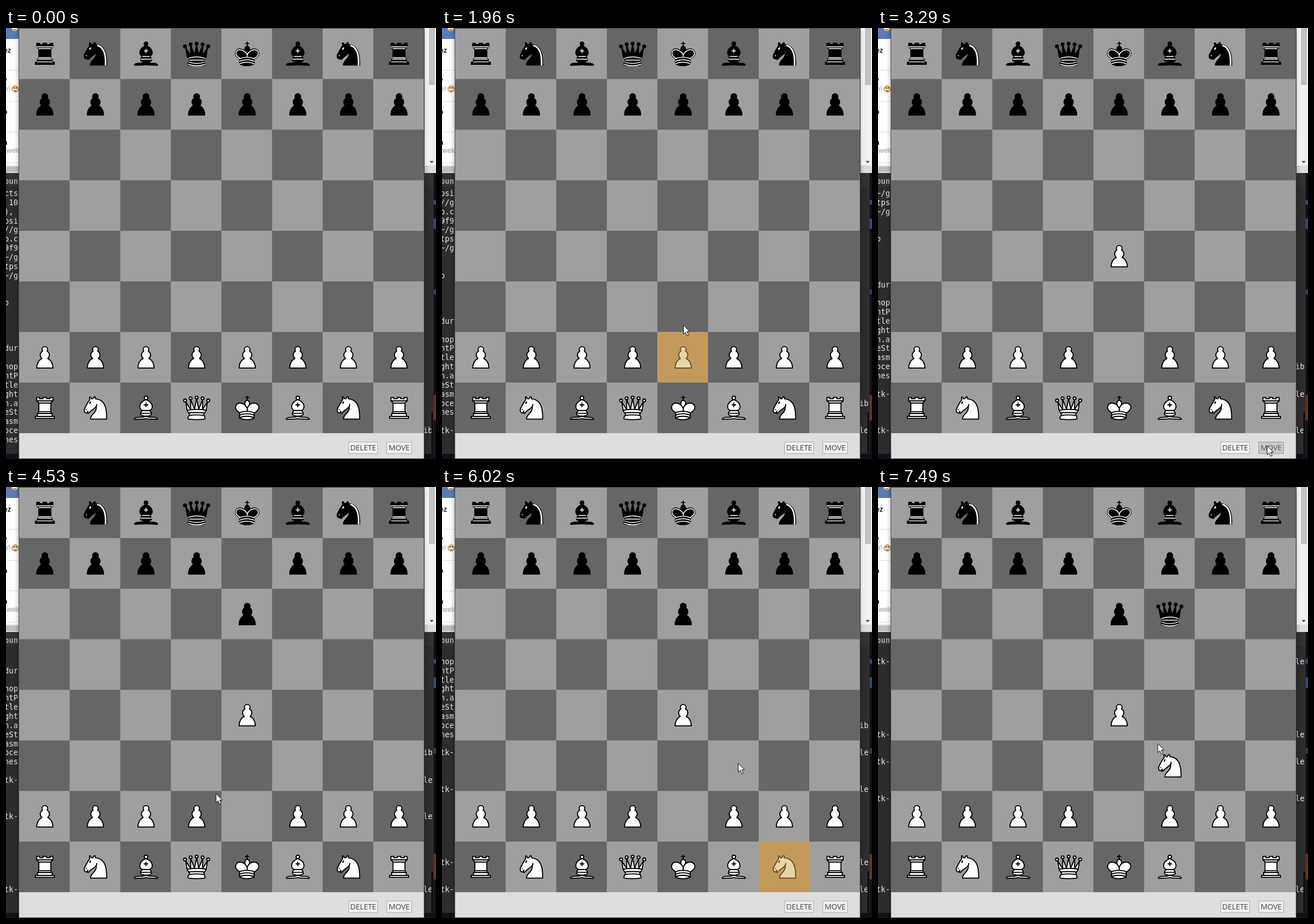
An HTML page with a canvas for the animation above (8 s loop, 747x749 px).

```html
<!DOCTYPE html>
<html>
<head>
<meta charset="utf-8">
<style>
html, body { margin: 0; width: 100%; height: 100%; overflow: hidden; background: #150e1a; }
canvas { display: block; }
</style>
</head>
<body>
<canvas id="stage" width="747" height="749"></canvas>
<script>
const ctx = document.getElementById('stage').getContext('2d');
const LOOP = 8000, CELL = 87.9, LEFT = 22.7, TOP = 0.9, SCALE = 1.22;

// Pieces on a 45-unit grid. body: filled and outlined; lines: inner strokes; dots: inner fills.
const kingBase = 'M11.5,30C17,27 27,27 32.5,30M11.5,33.5C17,30.5 27,30.5 32.5,33.5M11.5,37C17,34 27,34 32.5,37';
const circle = (x, y, r) => `M${x - r},${y}a${r},${r} 0 1 1 ${2 * r},0a${r},${r} 0 1 1 ${-2 * r},0z`;
const shapes = {
  p: { mid: [22, 24.25], body: [
    'M22,9C19.79,9 18,10.79 18,13C18,13.89 18.29,14.71 18.78,15.38C16.83,16.5 15.5,18.59 15.5,21C15.5,23.03 16.44,24.84 17.91,26.03C14.91,27.09 10.5,31.58 10.5,39.5L33.5,39.5C33.5,31.58 29.09,27.09 26.09,26.03C27.56,24.84 28.5,23.03 28.5,21C28.5,18.59 27.17,16.5 25.22,15.38C25.71,14.71 26,13.89 26,13C26,10.79 24.21,9 22,9z'] },
  r: { mid: [22.5, 24], body: [
    'M9,39H36V36H9z', 'M12,36V32H33V36z', 'M14,29.5V17H31V29.5z', 'M14,29.5H31L32.5,32H12.5z',
    'M11,14H34L31,17H14z', 'M11,14V9H15V11H20V9H25V11H30V9H34V14z'],
    darkLines: 'M12,35.5H33M13,31.5H32M14,29.5H31M14,16.5H31M11,14H34' },
  n: { mid: [22, 23], body: [
    'M22,10C32.5,11 38.5,18 38,39L15,39C15,30 25,32.5 23,18',
    'M24,18C24.38,20.91 18.45,25.37 16,27C13,29 13.18,31.34 11,31C9.96,30.06 12.41,27.96 11,28C10,28 11.19,29.23 10,30C9,30 6,31 6,26C6,24 12,14 12,14C12,14 13.89,12.1 14,10.5C13.27,9.5 13.5,8.5 13.5,7.5C14.5,6.5 16.5,10 16.5,10L18.5,10C18.5,10 19.28,8 21,7C22,7 22,10 22,10'],
    dots: circle(9, 25.5, 0.8) + 'M15.4,14A.8,1.8 30 1 1 13.6,17A.8,1.8 30 1 1 15.4,14',
    darkDots: 'M24.55,10.4L24.1,11.85L24.6,12C27.75,13 30.25,14.49 32.5,18.75C34.75,23 35.75,29.06 35.25,39L35.2,39.5H37.45L37.5,39C38,28.94 36.62,22.15 34.25,17.66C31.88,13.17 28.46,11.02 25.06,10.5z' },
  b: { mid: [22.5, 22.25], body: [
    'M9,36C12.39,35.03 19.11,36.43 22.5,34C25.89,36.43 32.61,35.03 36,36C36,36 37.65,36.54 39,38C38.32,38.97 37.35,38.99 36,38.5C32.61,37.53 25.89,38.96 22.5,37.5C19.11,38.96 12.39,37.53 9,38.5C7.65,38.99 6.68,38.97 6,38C7.35,36.06 9,36 9,36z',
    'M15,32C17.5,34.5 27.5,34.5 30,32C30.5,30.5 30,30 30,30C30,27.5 27.5,26 27.5,26C33,24.5 33.5,14.5 22.5,10.5C11.5,14.5 12,24.5 17.5,26C17.5,26 15,27.5 15,30C15,30 14.5,30.5 15,32z',
    circle(22.5, 8, 2.5)],
    lines: 'M17.5,26H27.5M15,30H30M22.5,15.5V20.5M20,18H25' },
  q: { mid: [22.5, 22.6], body: [
    circle(6, 12, 2) + circle(14, 9, 2) + circle(22.5, 8, 2) + circle(31, 9, 2) + circle(39, 12, 2),
    'M9,26C17.5,24.5 30,24.5 36,26L38,14L31,25V11L25.5,24.5L22.5,9.5L19.5,24.5L14,10.5V25L7,14z',
    'M9,26C9,28 10.5,28 11.5,30C12.5,31.5 12.5,31 12,33.5C10.5,34.5 10.5,36 10.5,36C9,37.5 11,38.5 11,38.5C17.5,39.5 27.5,39.5 34,38.5C34,38.5 35.5,37.5 34,36C34,36 34.5,34.5 33,33.5C32.5,31 32.5,31.5 33.5,30C34.5,28 36,28 36,26C27.5,24.5 17.5,24.5 9,26z'],
    lightLines: 'M11.5,30C15,29 30,29 33.5,30M12,33.5C18,32.5 27,32.5 33,33.5',
    darkLines: 'M11,29A35,35 0 0 1 34,29M12.5,31.5H32.5M11.5,34.5A35,35 0 0 0 33.5,34.5M10.5,37.5A35,35 0 0 0 34.5,37.5' },
  k: { mid: [22.5, 22.8], body: [
    'M22.5,11.63V6M20,8H25',
    'M22.5,25C22.5,25 27,17.5 25.5,14.5C25.5,14.5 24.5,12 22.5,12C20.5,12 19.5,14.5 19.5,14.5C18,17.5 22.5,25 22.5,25',
    'M11.5,37C17,40.5 27,40.5 32.5,37V30C32.5,30 41.5,25.5 38.5,19.5C34.5,13 25,16 22.5,23.5V27V23.5C19,16 9.5,13 6.5,19.5C3.5,25.5 11.5,29.5 11.5,29.5z'],
    lines: kingBase,
    darkLines: 'M32,29.5C32,29.5 40.5,25.5 38.03,19.85C34.15,14 25,18 22.5,24.5V26.6V24.5C20,18 9.9,14 7,19.85C4.5,25.5 11.85,28.85 11.85,28.85' },
};
for (const s of Object.values(shapes))
  for (const key in s)
    if (key === 'body') s.body = s.body.map(d => new Path2D(d));
    else if (key !== 'mid') s[key] = new Path2D(s[key]);

const start = 'rnbqkbnrpppppppp' + ' '.repeat(32) + 'PPPPPPPPRNBQKBNR';
const moves = [[2350, 52, 36], [3490, 12, 20], [6070, 62, 45], [7180, 3, 21]];
const selections = [[1440, 2350, 52], [5440, 6070, 62]];
const presses = [[3290, 3450], [7060, 7140]];
const scrolls = [[1440, 3], [2350, 7], [3490, 15], [5440, 18], [6070, 22], [7180, 32]];

// Terminal rows, visible left ends; log rows follow at irregular gaps
const rows = 'cts| 10|), |psi|//g|o.c|9f9|~/g|tps|~/g|||o|||||dur||hop|ntP|tle|ght|n.a|eSt|asm|oce|nes'.split('|');
for (const i of [29, 33, 41, 44, 48, 58]) rows[i] = 'tk-';

// Pointer strokes: begin, end, number of steps, then [fraction, x, y]
const strokes = [
  [680, 1240, 12, [0, 742, 722], [0.75, 432, 524], [1, 419.5, 547]],
  [1800, 2310, 13, [0, 419.5, 547], [1, 419, 406]],
  [2590, 3250, 16, [0, 419, 406], [0.25, 411, 397], [1, 676, 726]],
  [4180, 4950, 18, [0, 676, 726], [0.53, 344, 520], [1, 489, 587]],
  [4990, 5230, 7, [0, 489, 587], [1, 590, 658]],
  [5480, 6020, 14, [0, 590, 658], [1, 514.5, 480]],
  [6290, 7010, 17, [0, 514.5, 480], [1, 676, 720]],
  [7180, 7490, 8, [0, 676, 720], [1, 486, 446]],
];
const arrow = new Path2D('M0,0V15.5L3.6,12.2L6.2,18.2L8.8,17L6.2,11.2H11z');

function rect(color, x, y, w, h) {
  ctx.fillStyle = color;
  ctx.fillRect(x, y, w, h);
}

function text(str, x, y, font, color) {
  ctx.font = font;
  ctx.fillStyle = color;
  ctx.fillText(str, x, y);
}

function smiley(x, y) {
  ctx.fillStyle = '#ecca86';
  ctx.strokeStyle = '#94703c';
  ctx.lineWidth = 0.8;
  ctx.beginPath();
  ctx.arc(x, y, 5.8, 0, 7);
  ctx.fill();
  ctx.stroke();
  rect('#5a4028', x - 3, y - 3, 2, 2);
  rect('#5a4028', x + 1, y - 3, 2, 2);
  rect('#fff', x - 3, y, 6, 2);
  rect('#c86060', x - 2, y + 2, 4, 2);
}

function drawChat() {
  rect('#fff', 0, 0, 747, 239);
  rect('#5a7cb8', 0, 0, 22, 19);
  smiley(15, 0);
  for (const y of [73, 127, 180, 234]) rect('#dddfe3', 0, y, 22, 1);
  const bold = 'bold 12px "Liberation Sans", sans-serif';
  const plain = '12px "Liberation Sans", sans-serif';
  text('ez', -4, 43, bold, '#1d2129');
  text('y', -5, 95, bold, '#1d2129');
  text('e!', -3, 110, plain, '#90949c');
  smiley(16, 106);
  text('o', -5, 150, bold, '#1d2129');
  text('n', -5, 203, bold, '#1d2129');
  text('welc', 1, 217, plain, '#90949c');
  rect('#f1f1f1', 733, 0, 14, 239);
  rect('#c1c1c1', 735, 0, 10, 99);
  ctx.fillStyle = '#505050';
  ctx.fill(new Path2D('M736,231H743L739.5,235z'));
  rect('#dcdcdc', 0, 239, 747, 13);
  rect('#bcbcbc', 0, 241, 22, 9);
}

function drawTerminal(t) {
  rect('#333230', 0, 252, 743, 24);
  rect('#2d2d2d', 0, 276, 743, 464);
  text('bun', -3, 271, 'bold 13.3px "DejaVu Sans Mono", monospace', '#aaa69d');
  const shift = scrolls.reduce((s, [at, n]) => t >= at ? n : s, 0);
  const font = '13.2px "DejaVu Sans Mono", monospace';
  for (let i = 0; i < 28; i++) {
    const row = rows[i + shift], y = 292 + i * 15.85;
    if (!row) continue;
    text(row, -3, y, font, '#e8e8e8');
    const tail = { 'oce': 'ib', 'tk-': 'le' }[row];
    if (tail) text(tail, 725, y, font, '#e8e8e8');
  }
  rect('#0c0c0c', 739, 668, 3, 71);
  // desktop showing past the windows
  rect('#150e1a', 743, 252, 4, 497);
  rect('#2f4c7c', 743, 299, 4, 8);
  rect('#2f4c7c', 743, 331, 4, 18);
  rect('#27425f', 743, 454, 4, 9);
  rect('#6a3020', 743, 638, 4, 44);
  rect('#150e1a', 0, 740, 747, 9);
}

function drawPiece(code, x, y, selected) {
  const s = shapes[code.toLowerCase()], dark = code === code.toLowerCase();
  const edge = selected ? '#704a1f' : '#000';
  const fill = dark ? '#000' : selected ? '#e6d5a8' : '#fff';
  const inner = dark ? '#fff' : edge;
  ctx.save();
  ctx.translate(x, y);
  ctx.scale(SCALE, SCALE);
  ctx.translate(-s.mid[0], -s.mid[1]);
  ctx.lineWidth = 1.5;
  ctx.lineJoin = ctx.lineCap = 'round';
  ctx.fillStyle = fill;
  ctx.strokeStyle = edge;
  for (const path of s.body) {
    ctx.fill(path);
    ctx.stroke(path);
  }
  ctx.fillStyle = ctx.strokeStyle = inner;
  if (dark) ctx.lineWidth = 1.2;
  for (const path of [s.lines, dark ? s.darkLines : s.lightLines]) if (path) ctx.stroke(path);
  for (const path of [s.dots, dark && s.darkDots]) if (path) ctx.fill(path);
  ctx.restore();
}

function drawBoard(t) {
  const board = [...start];
  for (const [at, from, to] of moves)
    if (t >= at) {
      board[to] = board[from];
      board[from] = ' ';
    }
  const picked = selections.find(([a, b]) => t >= a && t < b);
  rect('#9f9f9f', LEFT, TOP, 8 * CELL, 8 * CELL);
  board.forEach((code, i) => {
    const col = i % 8, row = i >> 3, selected = !!picked && picked[2] === i;
    const x = LEFT + col * CELL, y = TOP + row * CELL;
    if (selected || (col + row) % 2) rect(selected ? '#c49a5c' : '#666', x, y, CELL, CELL);
    if (code !== ' ') drawPiece(code, x + CELL / 2 + 0.8, y + CELL / 2, selected);
  });
}

function drawButton(label, x, w, pressed) {
  rect(pressed ? '#9a9a9a' : '#b2b2b2', x, 719, w, 21);
  rect(pressed ? '#cacaca' : '#efefef', x + 1, 720, w - 2, 19);
  ctx.textAlign = 'center';
  text(label, x + w / 2, 734, '13px "Open Sans", "Noto Sans", sans-serif', pressed ? '#555' : '#444');
  ctx.textAlign = 'left';
}

function drawWindow(t) {
  ctx.save();
  ctx.shadowColor = 'rgba(0, 0, 0, 0.4)';
  ctx.shadowBlur = 8;
  rect('#333', 22, 0, 705, 749);
  ctx.restore();
  rect('#dedede', LEFT, 704, 8 * CELL, 44);
  drawBoard(t);
  drawButton('DELETE', 595, 51, false);
  drawButton('MOVE', 661, 44, presses.some(([a, b]) => t >= a && t < b));
}

function pointerAt(t) {
  const stroke = strokes.filter(s => t >= s[0]).pop();
  if (!stroke) return null;
  const [begin, end, steps, ...points] = stroke;
  const k = Math.floor((t - begin) / (end - begin) * (steps - 1));
  const f = Math.min(1, (k + 1) / steps);
  const i = points.findIndex(p => f <= p[0]);
  const [a, b] = [points[i - 1], points[i]];
  const e = (1 - Math.cos(Math.PI * (f - a[0]) / (b[0] - a[0]))) / 2;
  return [a[1] + (b[1] - a[1]) * e, a[2] + (b[2] - a[2]) * e];
}

function drawPointer(t) {
  const p = pointerAt(t);
  if (!p) return;
  ctx.save();
  ctx.translate(p[0], p[1]);
  ctx.lineWidth = 1;
  ctx.lineJoin = 'miter';
  ctx.fillStyle = '#fff';
  ctx.strokeStyle = '#111';
  ctx.fill(arrow);
  ctx.stroke(arrow);
  ctx.restore();
}

function frame(now) {
  const t = now % LOOP;
  drawChat();
  drawTerminal(t);
  drawWindow(t);
  drawPointer(t);
  requestAnimationFrame(frame);
}
requestAnimationFrame(frame);
</script>
</body>
</html>
```
